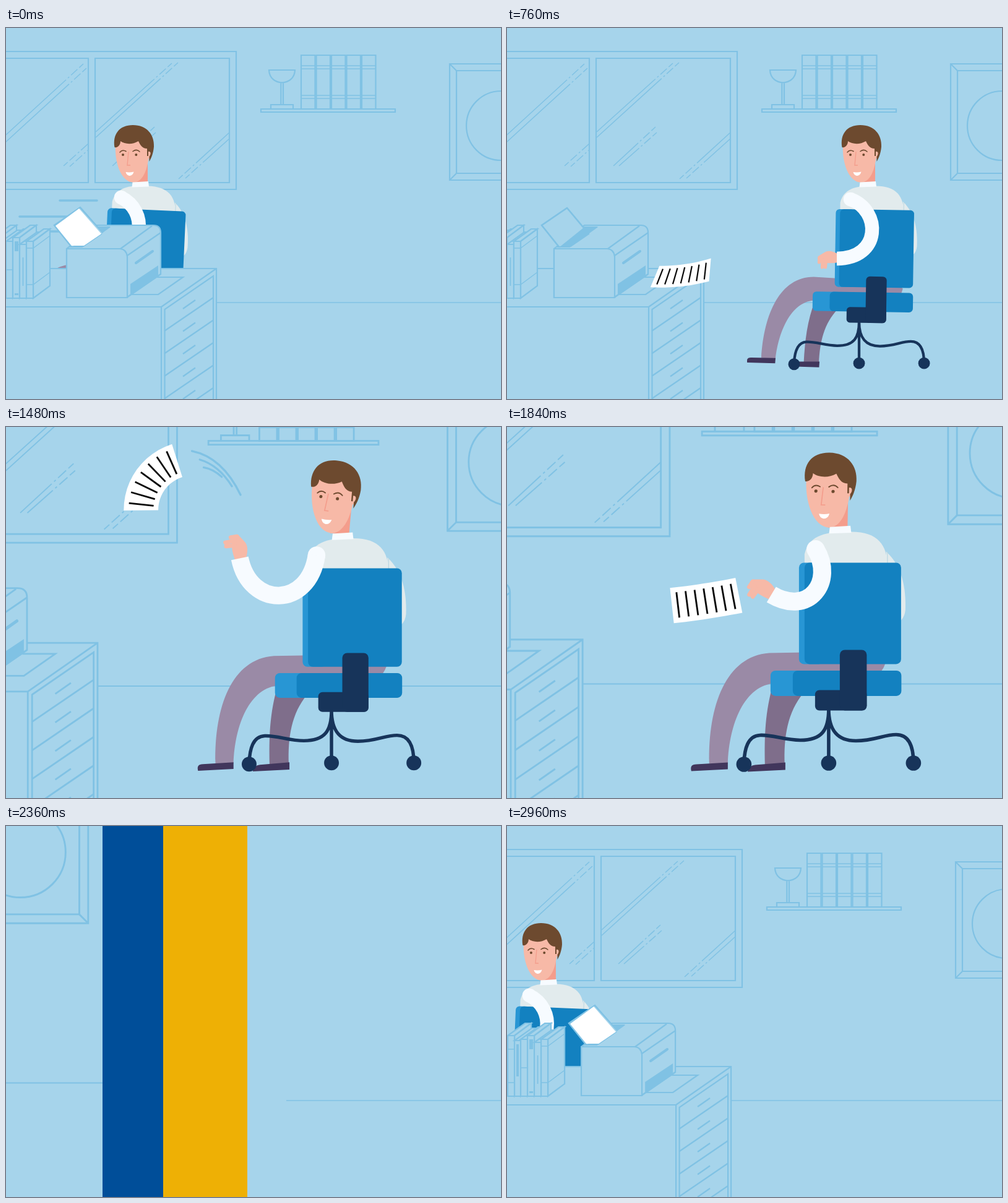
An HTML page with a canvas that plays this animation: 800x600 px, repeating every 3 s.

```html
<!DOCTYPE html>
<html lang="en">
<head>
<meta charset="utf-8">
<title>Office chair</title>
<style>
html, body { margin: 0; width: 100%; height: 100%; overflow: hidden; background: #a6d4eb; }
canvas { display: block; width: 800px; height: 600px; }
</style>
</head>
<body>
<canvas id="stage" width="800" height="600"></canvas>
<script>
const ctx = document.getElementById('stage').getContext('2d');
const LOOP = 3000, STEP = 40, RAD = Math.PI / 180;
const BG = '#a6d4eb', LINE = '#80c2e4', NAVY = '#17345a', BLUE = '#1381c0', SIDE = '#2896d4';
const SKIN = '#f7b9a7', SHADE = '#f49d8c', HAIR = '#6d4a2f', SHIRT = '#e2ebed', WHITE = '#f7fbff';

const clamp = v => Math.max(0, Math.min(1, v));

// Drawing helpers
function fill(color, d) {
  ctx.fillStyle = color;
  ctx.fill(new Path2D(d));
}
function line(d, width = 2.2, color = LINE, cap = 'butt') {
  ctx.strokeStyle = color;
  ctx.lineWidth = width;
  ctx.lineCap = cap;
  ctx.stroke(new Path2D(d));
}
function shape(d, width) {
  fill(BG, d);
  line(d, width);
}
function box(x, y, w, h, r, color) {
  ctx.fillStyle = color;
  ctx.beginPath();
  ctx.roundRect(x, y, w, h, r);
  ctx.fill();
}
function oval(x, y, rx, ry, color) {
  ctx.fillStyle = color;
  ctx.beginPath();
  ctx.ellipse(x, y, rx, ry, 0, 0, 7);
  ctx.fill();
}
const rect = (x1, y1, x2, y2) => `M${x1} ${y1}H${x2}V${y2}H${x1}Z`;
function group(draw) {
  ctx.save();
  draw();
  ctx.restore();
}
function turn(deg, x, y) {
  ctx.translate(x, y);
  ctx.rotate(deg * RAD);
  ctx.translate(-x, -y);
}

// Monotone curve through rows of [time, values...]
function track(t, rows) {
  const last = rows.length - 1;
  if (t <= rows[0][0]) return rows[0].slice(1);
  if (t >= rows[last][0]) return rows[last].slice(1);
  let i = 0;
  while (t >= rows[i + 1][0]) i++;
  const span = rows[i + 1][0] - rows[i][0], u = (t - rows[i][0]) / span;
  const slope = (n, c) => (rows[n + 1][c] - rows[n][c]) / (rows[n + 1][0] - rows[n][0]);
  const tangent = (n, c) => {
    if (n === 0 || n === last) return 0;
    const a = slope(n - 1, c), b = slope(n, c);
    return a * b <= 0 ? 0 : 2 * a * b / (a + b);
  };
  return rows[i].slice(1).map((v, j) => {
    const c = j + 1, w = rows[i + 1][c];
    return v + (w - v) * u * u * (3 - 2 * u)
      + span * u * (1 - u) * ((1 - u) * tangent(i, c) - u * tangent(i + 1, c));
  });
}

// Motion
const REST = [555, 277, 605, 295, 605, 373, 533, 373];
const RAISED = [550, 277, 540, 345, 465, 345, 452, 281];
const ARM = [
  [0, 552, 274, 595, 295, 591, 362, 533, 373], [600, ...REST],
  [860, ...REST], [970, 553, 278, 575, 340, 540, 385, 490, 352],
  [1080, 551, 278, 548, 355, 495, 365, 457, 305],
  [1280, ...RAISED], [1720, ...RAISED], [1940, ...REST]
];
// x, y, angle, bend, length, height, shear
const HELD = [474.7, 366, 12, -22, 84, 44, 0];
const PAPER = [
  [500, 200, 421, -35, -4, 4, 26, -1], [640, 226, 413, -18, -10, 62, 31, -0.6],
  [760, 284, 400, -7, -18, 90, 35, -0.38], [910, ...HELD],
  [1080, 443, 194.7, 64, 57, 84, 44, 0], [1270, 408, 128, 0, 66, 84, 44, 0],
  [1480, 338.6, 180.4, -54, 73, 84, 44, 0], [1720, 352, 295, -36, 24, 84, 44, 0],
  [1960, ...HELD]
];
const LEAN = [[-120, 2], [0, 2.6], [400, 1.6], [760, 0.9], [980, 0]];
const LEGS = [[0, 28], [350, 17], [760, 4.5], [960, 0]];
const HEAD = [[760, 0, 0, 0], [1080, 4.5, 0.4, -1], [1480, 5, 0.4, -1.4], [1720, 5, 0.4, -1.4], [1980, -4, -4.6, 2]];

// Room
function glare(x1, y1, x2, y2) {
  ctx.setLineDash([9, 4, 14, 4, 3, 4, 900]);
  line(`M${x1} ${y1}L${x2} ${y2}`, 1.5);
  ctx.setLineDash([]);
}

function wall() {
  line('M-571 444H921', 1.6);
  line(rect(-95, 38, 372, 261) + rect(-84, 49, 133, 250) + rect(144, 49, 361, 250));
  glare(268, 57, 145, 168);
  glare(278, 56, 145, 177);
  glare(240, 160, 172, 223);
  glare(242, 169, 181, 223);
  glare(279, 244, 361, 169);
  glare(290, 243, 361, 179);
  glare(125, 58, -84, 250);
  glare(130, 65, -72, 250);
  glare(93, 223, 133, 187);
  glare(103, 224, 133, 197);

  line(rect(412, 131, 629, 136) + rect(428, 124, 464, 131));
  line('M425 68H467C466 95 426 95 425 68ZM444.3 88V124M448 88V124');
  for (let i = 0; i < 5; i++) {
    const x = 477 + i * 24.5;
    line(rect(x, 44, x + 22.5, 131));
    line(`M${x} 61h22M${x} 66h22M${x} 109h22M${x} 114h22`, 1.3);
  }

  line(rect(717, 58, 884, 246) + rect(728, 69, 873, 235));
  line('M717 58L728 69M884 58L873 69M717 246L728 235M884 246L873 235');
  ctx.beginPath();
  ctx.arc(800, 158, 56, 0, 7);
  ctx.stroke();
}

function book(x, w, top) {
  const r = x + w, back = top - 20;
  shape(`M${x} ${top}L${x + 28} ${back}H${r + 27}L${r} ${top}Z`);
  shape(`M${r} ${top}L${r + 27} ${back}V417L${r} 437Z`);
  shape(rect(x, top, r, 437));
}

function books() {
  book(-43, 11, 339);
  line('M-43 361h11M-43 415h11', 1.5);
  book(-32, 10, 347);
  fill(LINE, rect(-29, 353, -25, 405));
  book(-22, 11, 345);
  line('M-22 391h11', 1.5);
  book(-11, 11, 339);
  fill(LINE, rect(-8, 345, -2, 361) + rect(-8, 429, -2, 432));
  book(0, 11, 350);
  line('M5.5 371V417', 1.8);
  book(11, 11, 345);
  line('M11 356h11L49 336M11 415h11L49 395', 1.4);
}

function printer(t) {
  shape('M179 431H224L264 403H222');
  shape('M76 436V357L125 319H216Q228 319 228 331V398L173 436Z');
  fill(LINE, 'M79 355H101L147 321H124Z');
  shape('M84 354L56 319L97 291L132 333L103 353Z');
  fill(LINE, 'M84 355L125 322H147L101 355Z');
  line('M84 354L56 319L97 291L124 323');

  const fed = track(t, [[60, 0], [430, 1]])[0];
  if (fed < 1) group(() => {
    ctx.clip(new Path2D('M0 250H200V286L132 333L104 352H0Z'));
    ctx.translate(39 * fed, 50 * fed);
    fill(BG, 'M84 354L57 319L97 291L135 333Z');
    line('M84 354L57 319L98 290L135 332');
    fill('#fff', 'M58 320L96 292L132 333L92 362Z');
  });

  shape('M76 436V357H162Q173 358 174 370V436Z');
  line('M163 357L214 320M174 368L228 331M173 436L228 398');
  line('M188 380L215 361', 4, LINE, 'round');
  fill(LINE, 'M179 414L224 384V402L179 432Z');
}

function desk(t) {
  fill(BG, rect(-180, 389, 318, 900));
  line('M-180 900V389H318V900M-180 451H229V900M229 451L318 389');
  line('M234.5 900V455L313 401V900');
  for (let y = 490; y < 800; y += 36.5) {
    line(`M234 ${y}L313 ${y - 54}M264 ${y - 36}L284 ${y - 50}`);
  }
  books();
  printer(t);
}

// Figure, laid out at the close-up scale
const closeUp = () => {
  ctx.scale(1 / 1.304, 1 / 1.304);
  ctx.translate(431, 164);
};

function legs() {
  fill('#7f6e8b', 'M222 412C208 460 207 500 208 546H240C238 500 245 460 270 430L290 412Z');
  fill('#41365c', 'M180 557Q182 547 192 546L241 542V554Z');
  fill('#9a8aa6', 'M385 362L215 365C145 370 116 450 118 544H148C150 480 175 416 225 414H360Q400 405 404 375Z');
  fill('#41365c', 'M89 556Q86 545 97 545L148 542V553Z');
}

function base() {
  line('M311 455V543M311 455C311 490 300 506 265 506C240 506 220 497 200 498C180 499 175 520 174 543'
    + 'M311 455C311 490 325 507 355 507C385 507 400 497 420 497C440 497 448 515 448 543', 5.6, NAVY);
  oval(174, 545, 12.3, 12.3, NAVY);
  oval(311, 543, 12.3, 12.3, NAVY);
  oval(448, 543, 12.3, 12.3, NAVY);
}

function torso() {
  fill(SHIRT, 'M404 201C430 225 436 260 435 295Q434 306 428 312H404Z');
  fill(SHIRT, 'M272 225V205C280 172 310 169 345 169C390 168 406 190 406 225Z');
  line('M406 202V220', 1.2, '#b9d6e0');
}

function chair() {
  box(263, 219, 40, 164, 8, SIDE);
  box(272, 219, 156, 164, 8, BLUE);
  box(217, 393.5, 60, 41, 8, SIDE);
  box(253, 393.5, 175.5, 41, 8, BLUE);
  box(289, 425, 83.5, 33, 7, NAVY);
  box(329, 360, 43.5, 98, 8, NAVY);
}

function head(t) {
  const [angle, dx, dy] = track(t, HEAD);
  ctx.translate(dx, dy);
  turn(angle, 566, 205);
  fill(SHADE, 'M572 232L595 205V250H571Z');
  fill(SKIN, 'M543 188C541 215 551 250 573 250C589 248 595 225 597 206V180H545Z');
  oval(597, 205, 3.6, 6, SKIN);
  fill(HAIR, 'M541.5 193C538 172 549 157 571 157C594 157 606 173 605 192C604 203 601 210 597.5 216V208'
    + 'C601 204 600 199 596 200V207H594V195C586 195 583 189 580 183C570 189 558 188 551 183C551 189 547 194 541.5 193Z');
  turn(angle * 0.5, 566, 205);
  line('M550 201Q554 196 560 199.5M571 199.5Q577 195 582 200', 1.5, HAIR, 'round');
  if (t > 1900) {
    line('M553 207Q555.5 202 558 207M574 207Q576.5 202 579 207', 1.5, HAIR, 'round');
  } else {
    oval(555, 205, 2, 2, HAIR);
    oval(576.3, 205, 2, 2, HAIR);
  }
  line('M564 200L562 222H567', 1.3, SHADE);
  fill('#fff', 'M559.5 233Q566 234 572.5 232.5Q571 239 565.5 239Q560.5 238 559.5 233Z');
}

function body(t) {
  const rush = track(t, [[-40, 1], [0, 1], [240, 0]])[0];
  if (rush > 0) {
    line(`M${513 - 60 * rush} 279H513M${464 - 76 * rush} 305H464M${462 - 30 * rush} 329H462`, 3.6, LINE, 'round');
  }
  const lean = track(t, LEAN)[0];
  group(() => {
    turn(track(t, LEGS)[0], 535, 410);
    closeUp();
    legs();
  });
  group(() => {
    closeUp();
    base();
  });
  group(() => {
    turn(lean, 590, 250);
    closeUp();
    torso();
    chair();
  });
  group(() => head(t));
  fill(WHITE, 'M570.5 249.5L596 248L597 256.5L569.5 257.5Z');
}

function arm(t) {
  const [x, y, ax, ay, bx, by, ex, ey] = track(t, ARM);
  group(() => {
    ctx.translate(ex, ey);
    ctx.rotate(Math.atan2(by - ey, bx - ex));
    fill(SKIN, 'M3 -7C-6 -12 -14 -14 -20 -10L-30 -4Q-33 2 -26 5L-16 7Q-8 8 3 6Z');
    line('M-28 -2L-28.5 6M-23 2L-23.5 14M-17.5 3L-18.5 14', 5.2, SKIN, 'round');
  });
  oval(x, y, 11.2, 11.2, WHITE);
  line(`M${x} ${y}C${ax} ${ay} ${bx} ${by} ${ex} ${ey}`, 22.4, WHITE);
}

function paper(t) {
  if (t < 500) return;
  const [x, y, angle, curl, len, h, shear] = track(t, PAPER);
  const phi = angle * RAD, bend = curl * RAD || 1e-3, r = len / bend;
  const at = (u, v) => {
    const a = phi + bend * u, c = Math.cos(a), s = Math.sin(a), d = v * h;
    return [
      x + r * (s - Math.sin(phi)) + d * (shear * c - s),
      y - r * (c - Math.cos(phi)) + d * (shear * s + c)
    ];
  };
  const edge = [];
  for (let i = 0; i <= 12; i++) edge.push(at(i / 12 - 0.5, -0.5));
  for (let i = 12; i >= 0; i--) edge.push(at(i / 12 - 0.5, 0.5));
  fill('#fff', 'M' + edge.join('L') + 'Z');
  for (let i = -3; i <= 3; i++) {
    line(`M${at(i * 0.137, -0.36)}L${at(i * 0.137, 0.36)}`, 2.2 * clamp(len / 80), '#0a0a0a');
  }
}

function swishes(t) {
  if (t >= 1020 && t < 1160) {
    line('M435 256Q432 284 420 308M442.5 264.5Q441 292 431 318M456.5 277.5Q454 305 441.5 330', 2.6, LINE, 'round');
  }
  if (t >= 1360 && t < 1560) {
    line('M391 144Q430 152 453 200M401 155Q425 162 442 189M406 165Q418 167 429 177', 2.6, LINE, 'round');
  }
}

function scene(t) {
  const zoom = (1 - Math.cos(Math.PI * clamp((t - 820) / 854))) / 2;
  const scale = 1 + 0.304 * zoom;
  const pan = -798 * Math.max(0, (t - 1805) / 555) ** 3;
  const wallX = 8 * Math.max(0, -t / 40) ** 1.75;
  const deskX = 22 * Math.max(0, (82 - t) / 82) ** 1.75 - 54 * zoom;
  const manX = -366 * Math.max(0, (446 - t) / 446) ** 4;
  const shifted = (x, draw) => group(() => {
    ctx.translate(x, 0);
    draw(t);
  });

  ctx.fillStyle = BG;
  ctx.fillRect(0, 0, 800, 600);
  group(() => {
    ctx.translate(pan - 730 * (scale - 1), -538 * (scale - 1));
    ctx.scale(scale, scale);
    shifted(wallX, wall);
    if (t < 600) {
      shifted(manX, body);
      shifted(manX, arm);
      shifted(deskX, desk);
      paper(t);
    } else {
      shifted(deskX, desk);
      body(t);
      paper(t);
      arm(t);
      swishes(t);
    }
  });
}

function draw(t) {
  // Two bands wipe leftwards from one pass of the scene to the next
  const wipe = 156 - 4.3 * (t - 2360), next = wipe + 234;
  if (next > 0) scene(t);
  if (wipe < 800) {
    group(() => {
      ctx.beginPath();
      ctx.rect(Math.max(0, next), 0, 800, 600);
      ctx.clip();
      scene(t - LOOP);
    });
    ctx.fillStyle = '#004e99';
    ctx.fillRect(wipe, 0, 98, 600);
    ctx.fillStyle = '#eeb005';
    ctx.fillRect(wipe + 98, 0, 136, 600);
  }
}

// Each pose is held for one step
const start = performance.now();
function tick() {
  const t = (performance.now() - start) % LOOP;
  draw(Math.floor(t / STEP) * STEP);
  requestAnimationFrame(tick);
}
tick();
</script>
</body>
</html>
```
